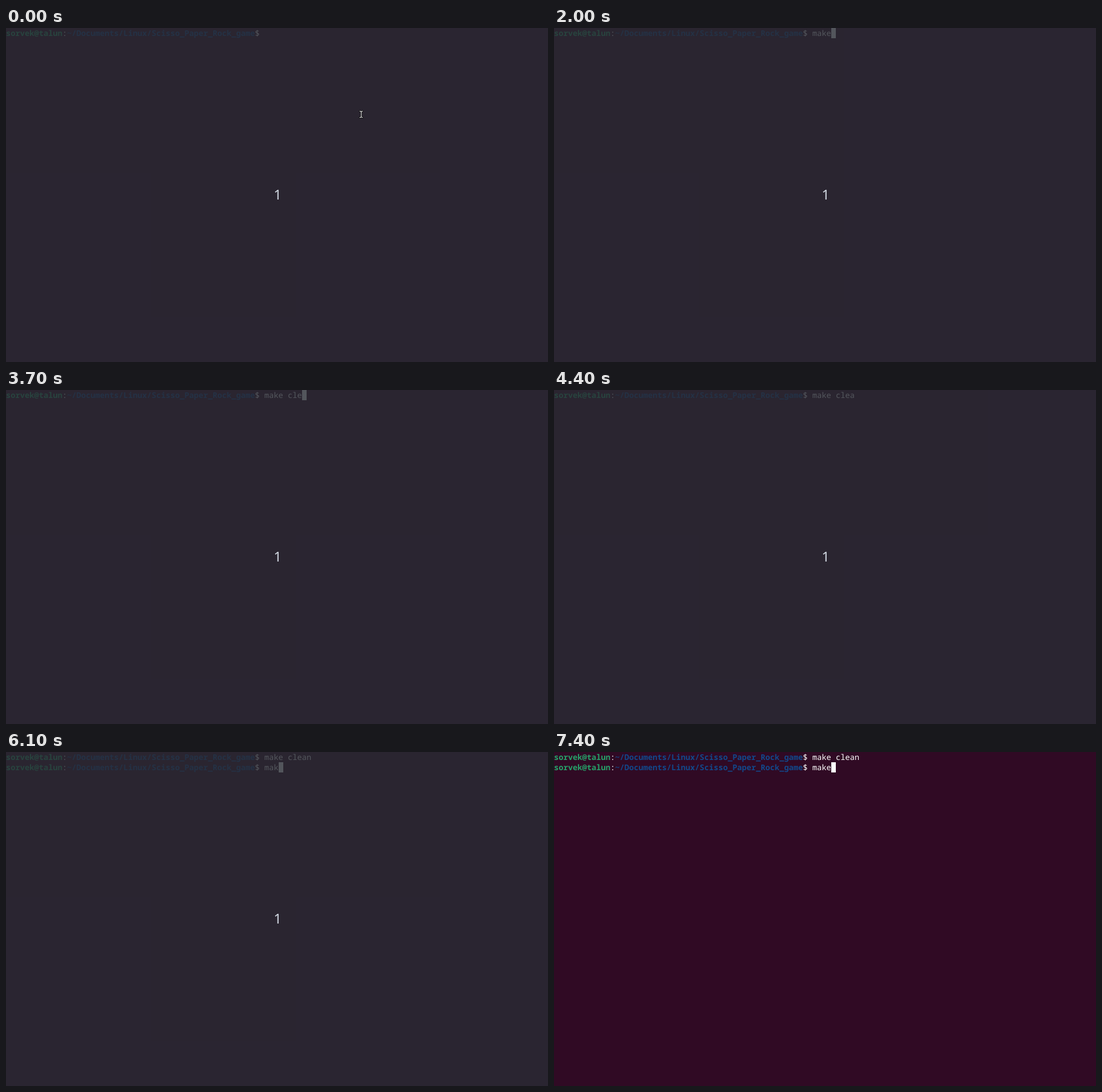
Write an HTML page that moves like this. It is 952 px wide and 588 px high and loops after 8000 ms.

```html
<!DOCTYPE html>
<html lang="en">
<head>
<meta charset="utf-8">
<title>Terminal session</title>
<style>
  html, body { margin: 0; width: 100%; height: 100%; overflow: hidden; background: #300a24; }
  svg { display: block; }
  text { white-space: pre; text-rendering: geometricPrecision; }
  .line { font: 13.76px "Noto Sans Mono", "DejaVu Sans Mono", monospace; fill: #fff; }
  .user, .path { font-weight: 700; }
  .user { fill: #26a269; }
  .path { fill: #12488b; }
  .count { font: 24px "Noto Sans", sans-serif; fill: #d3dae3; }
</style>
</head>
<body>
<svg width="952" height="588" viewBox="0 0 952 588">
  <rect width="952" height="588" fill="#300a24"/>
  <g id="lines"></g>
  <rect id="caret" width="8" height="18" fill="#fff"/>
  <g id="countdown">
    <rect width="952" height="588" fill="#282c34" fill-opacity=".8"/>
    <text class="count" x="470.2" y="302">1</text>
  </g>
  <g id="pointer" fill="none" stroke-linecap="square">
    <path id="beam" d="M621.5 146.5H622.5L624 147.5L625.5 146.5H626M624 147.5V156.5M621.5 157.5H622.5L624 156.5L625.5 157.5H626" stroke="#111" stroke-width="2.6"/>
    <use href="#beam" style="stroke:#fff"/>
    <path d="M621.5 146.5H622.5L624 147.5L625.5 146.5H626M624 147.5V156.5M621.5 157.5H622.5L624 156.5L625.5 157.5H626" stroke="#f4f4f4" stroke-width="1.1"/>
  </g>
</svg>
<script>
const LOOP = 8000, CELL = 8.256, ROW = 18, PROMPT = 55;
const POINTER_HIDES = 1500, COUNTDOWN_ENDS = 6300;
const ENTER = 4900, SECOND_PROMPT = 5000;

// When each character of a command appears.
const commands = [
  { text: "make clean", shown: 0, keys: [1600, 1700, 1800, 2000, 2200, 3200, 3600, 3700, 3800, 4700] },
  { text: "make", shown: SECOND_PROMPT, keys: [5900, 6000, 6100, 6300] }
];
// The caret flips at each of these times, starting hidden.
const blinks = [100, 700, 1300, 2800, 3200, 4400, 4600, 5500, 5800, 6800, 7400];

const byId = id => document.getElementById(id);
const show = (node, on) => node.setAttribute("visibility", on ? "visible" : "hidden");
const countUntil = (times, t) => times.filter(time => time <= t).length;

const caret = byId("caret"), pointer = byId("pointer"), countdown = byId("countdown");

byId("lines").innerHTML = commands.map((_, row) =>
  `<text class="line" x="0" y="${14 + row * ROW}"><tspan class="user">sorvek@talun</tspan>:` +
  `<tspan class="path">~/Documents/Linux/Scisso_Paper_Rock_game</tspan>$ <tspan class="typed"></tspan></text>`
).join("");
const lines = [...document.querySelectorAll(".line")];

function render(t) {
  commands.forEach(({ text, shown, keys }, row) => {
    show(lines[row], t >= shown);
    lines[row].querySelector(".typed").textContent = text.slice(0, countUntil(keys, t));
  });

  const row = t < ENTER ? 0 : 1;
  const waiting = t >= ENTER && t < SECOND_PROMPT;
  const column = waiting ? 0 : PROMPT + countUntil(commands[row].keys, t);
  caret.setAttribute("x", Math.round(column * CELL));
  caret.setAttribute("y", row * ROW);
  show(caret, countUntil(blinks, t) % 2 === 1);

  show(pointer, t < POINTER_HIDES);
  show(countdown, t < COUNTDOWN_ENDS);
}

const start = performance.now();
function tick(now) {
  render(Math.max(0, now - start) % LOOP);
  requestAnimationFrame(tick);
}
render(0);
requestAnimationFrame(tick);
</script>
</body>
</html>
```
